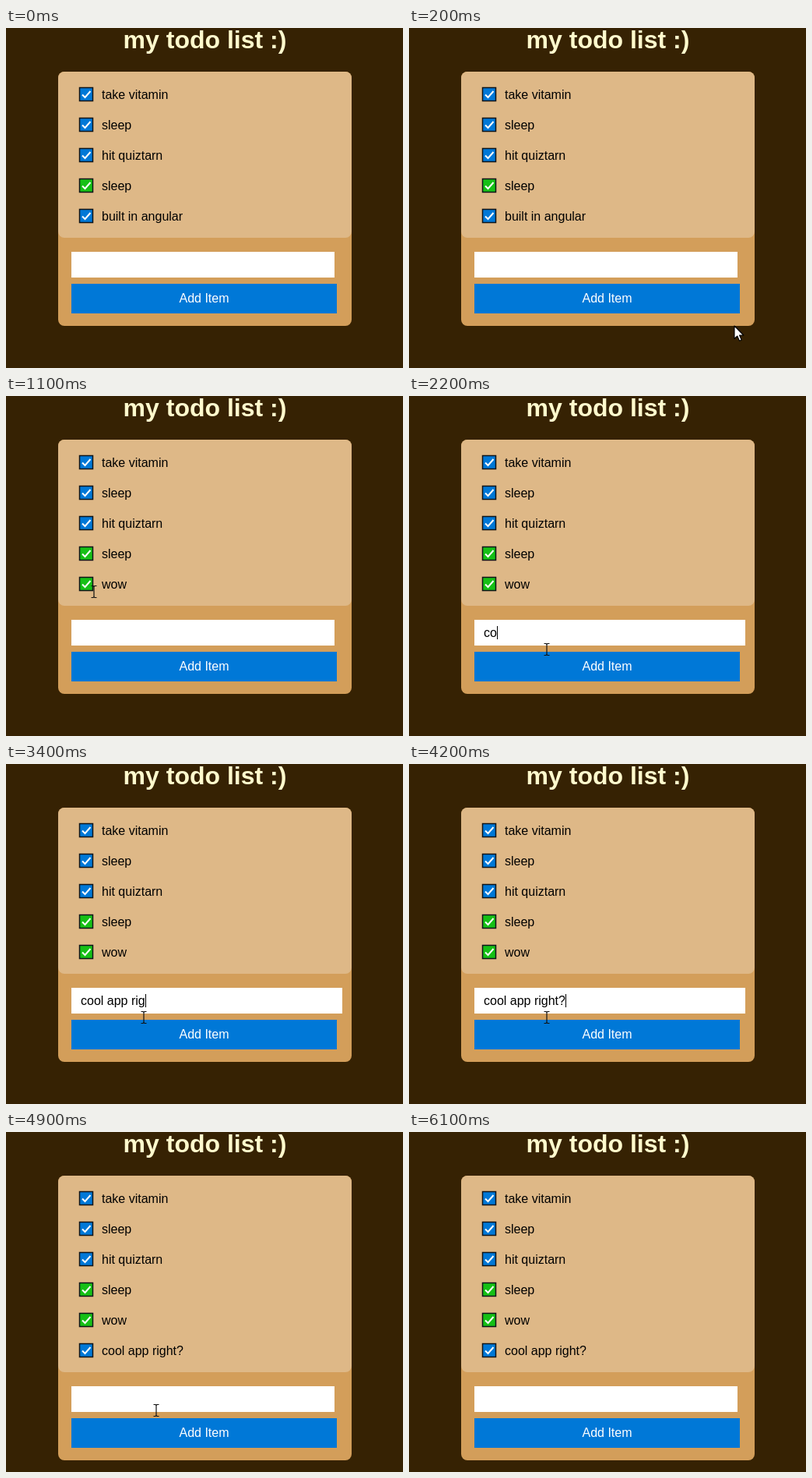
An HTML page that plays this animation: 510x436 px, repeating every 6200 ms.

```html
<!DOCTYPE html>
<html lang="en">
<head>
<meta charset="utf-8">
<title>my todo list</title>
<style>
  html, body { margin: 0; width: 100%; height: 100%; overflow: hidden; background: #362203; }
  svg { display: block; width: 510px; height: 436px; }
  text { font: 16px "Liberation Sans", Arial, sans-serif; white-space: pre; }
  .title { font-size: 32px; font-weight: bold; fill: #fffacd; }
  .panel { fill: #d39e5a; }
  .card { fill: #deb887; }
  .box { stroke: #101418; stroke-width: 1.5; }
  .tick { fill: none; stroke: #fff; stroke-width: 2; }
  .caret { stroke: #000; }
  .pointer { fill: #fff; stroke: #000; stroke-width: 1.1; stroke-linejoin: round; }
  .beam { fill: none; stroke: #111; stroke-width: 1.2; }
</style>
</head>
<body>
<svg viewBox="0 0 510 436">
  <text class="title" x="255.5" y="26" text-anchor="middle">my todo list :)</text>
  <rect class="panel" id="panel" x="67" y="56" width="377" rx="8"/>
  <rect class="card" id="card" x="67" y="56" width="377" rx="8"/>
  <g id="items"></g>
  <g id="form">
    <rect id="field" x="84" y="287" height="33" fill="#fff"/>
    <text id="entry" y="309"></text>
    <path class="caret" id="caret" d="M.5 295V312"/>
    <rect id="button" x="84" y="328" width="341" height="38"/>
    <text x="254.5" y="352" text-anchor="middle" fill="#fff">Add Item</text>
  </g>
  <g id="cursor">
    <path class="pointer" id="arrow" d="M0 0V16.5L3.8 13L6.5 19.2L9.2 18L6.5 12H11.8Z"/>
    <path class="beam" id="beam" d="M-3.5-7.5H-1L0-6.5L1-7.5H3.5M0-6.5V6.5M-3.5 7.5H-1L0 6.5L1 7.5H3.5"/>
    <g class="pointer" id="hand">
      <path d="M-2 1Q0-2 2 1V7Q4.500 5 6 8Q8.500 6.500 9.500 9Q12 8 12 11V16Q11.500 19 10 20V23H0V20L-6 13Q-7.500 9-4 10L-2 12Z"/>
      <path fill="none" d="M2 7V11M6 8V11.500M9.500 9V12"/>
    </g>
  </g>
</svg>
<script>
const LOOP = 6200, STEP = 100, ROW = 39;
const BLUE = '#0078d7', GREEN = '#16c016', HOVER = '#005ba3';
const PHRASE = 'cool app right?';
const FOCUS = 1500, SWAP = 900, BLUR = 4600, ADD = 4800;

// [time, characters typed]
const TYPING = [[1900, 0], [2000, 1], [2200, 2], [3400, 12], [3700, 14], [4000, 15]];
// [time, x, y] of the cursor's hotspot
const ROUTE = [
  [100, 476, 414], [300, 360, 350], [500, 180, 258], [700, 101, 222],
  [800, 102, 233], [900, 104, 240], [1100, 113, 251], [1400, 177, 325],
  [4300, 177, 325], [4500, 188, 350], [4600, 193, 357], [5100, 193, 357],
  [5200, 198, 386], [5300, 204, 418], [5400, 208, 445]
];

const $ = id => document.getElementById(id);
const set = (el, attrs) => { for (const k in attrs) el.setAttribute(k, attrs[k]); };
const show = (el, on) => { el.style.display = on ? '' : 'none'; };

function sample(track, t, col) {
  const next = track.findIndex(key => key[0] > t);
  if (next === 0) return track[0][col];
  if (next < 0) return track[track.length - 1][col];
  const a = track[next - 1], b = track[next];
  return a[col] + (b[col] - a[col]) * (t - a[0]) / (b[0] - a[0]);
}

function addItem(label, i) {
  const g = document.createElementNS('http://www.w3.org/2000/svg', 'g');
  set(g, { transform: `translate(0 ${i * ROW})` });
  g.innerHTML = `<rect class="box" x="94.500" y="76.500" width="17" height="17" fill="${i === 3 ? GREEN : BLUE}"/>
    <path class="tick" d="M98 85.500L101.500 89L108.500 81"/><text x="123" y="91">${label}</text>`;
  $('items').append(g);
  return g;
}

const items = ['take vitamin', 'sleep', 'hit quiztarn', 'sleep', 'built in angular', PHRASE].map(addItem);

function cursorShape(t) {
  if (t < 100 || t >= 5400) return '';
  if (t < 1000) return 'arrow';
  if (t >= 4400 && t <= ADD || t === 5200) return 'hand';
  return t === 5300 ? 'arrow' : 'beam';
}

function draw(t) {
  const swapped = t >= SWAP, added = t >= ADD;
  const focused = t >= FOCUS && t < BLUR;
  const grow = added ? ROW : 0;

  set($('panel'), { height: 326 + grow });
  set($('card'), { height: 213 + grow });
  set($('form'), { transform: `translate(0 ${grow})` });
  items[4].querySelector('text').textContent = swapped ? 'wow' : 'built in angular';
  set(items[4].querySelector('rect'), { fill: swapped ? GREEN : BLUE });
  show(items[5], added);

  const entry = $('entry');
  entry.textContent = added ? '' : PHRASE.slice(0, Math.floor(sample(TYPING, t, 1) + 1e-6));
  set(entry, { x: focused ? 96 : 86 });
  set($('field'), { width: focused ? 348 : 338 });
  show($('caret'), focused);
  const caretX = 96 + Math.round(entry.getComputedTextLength());
  set($('caret'), { transform: `translate(${caretX} 0)` });

  const shape = cursorShape(t);
  for (const id of ['arrow', 'beam', 'hand']) show($(id), id === shape);
  const x = Math.round(sample(ROUTE, t, 1)), y = Math.round(sample(ROUTE, t, 2));
  set($('cursor'), { transform: `translate(${x} ${y})` });
  set($('button'), { fill: shape === 'hand' && t !== ADD ? HOVER : BLUE });
}

const start = performance.now();
function tick() {
  const t = (performance.now() - start) % LOOP;
  draw(Math.floor(t / STEP) * STEP);
  requestAnimationFrame(tick);
}
tick();
</script>
</body>
</html>
```
